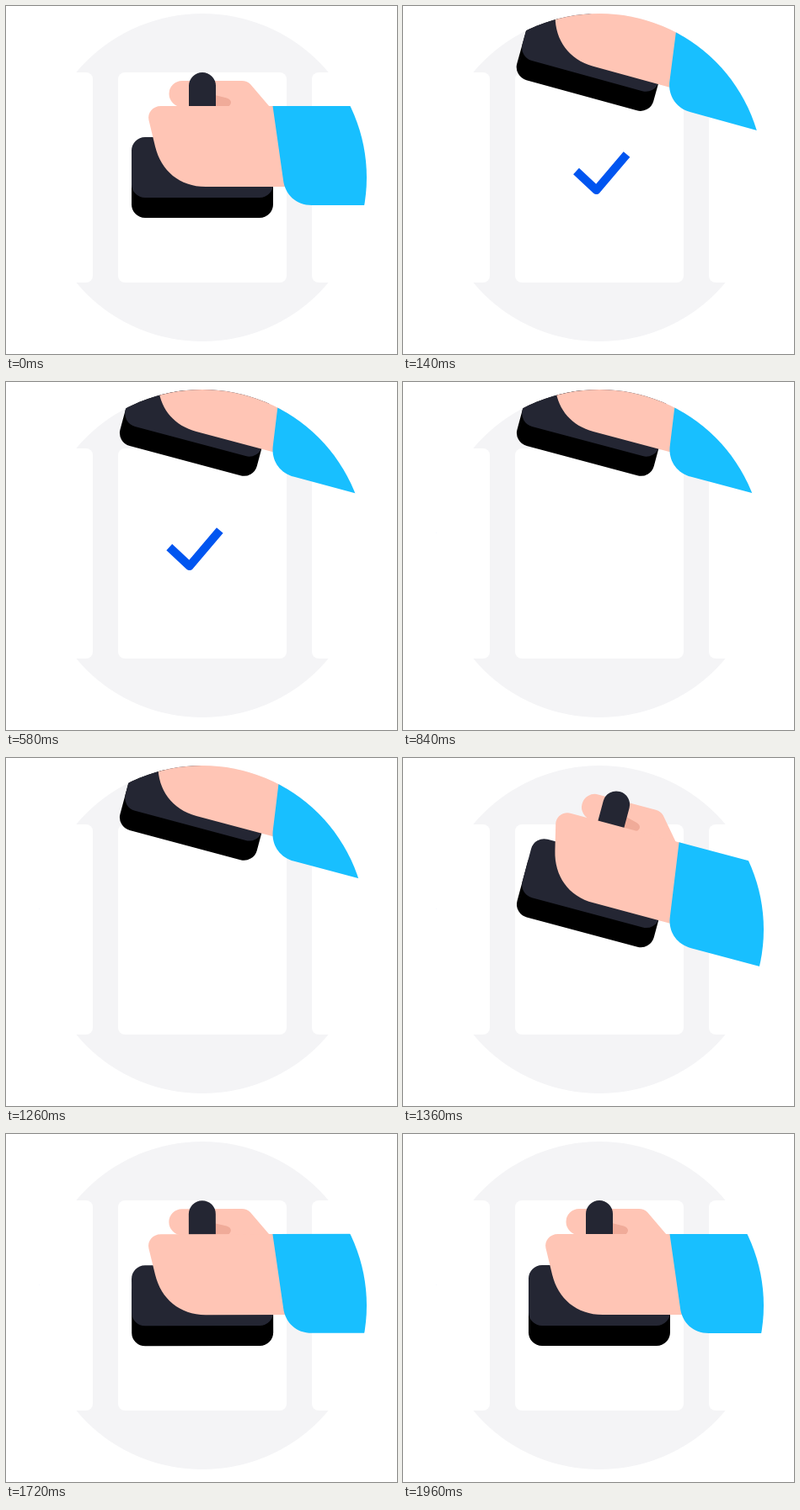
Animation of 464x414 px, one loop 2360 ms. Source, as an HTML page:

```html
<!DOCTYPE html>
<html lang="en">
<head>
<meta charset="utf-8">
<title>Stamp</title>
<style>
  html, body { margin: 0; width: 100%; height: 100%; overflow: hidden; background: #fff; }
  svg { display: block; }
</style>
</head>
<body>
<svg width="464" height="414" viewBox="0 0 464 414">
  <clipPath id="disc"><circle cx="233" cy="204" r="195"/></clipPath>
  <circle cx="233" cy="204" r="195" fill="#f4f4f6"/>
  <g fill="#fff">
    <rect x="-97" y="79" width="200" height="250" rx="8"/>
    <rect x="133" y="79" width="200" height="250" rx="8"/>
    <rect x="363" y="79" width="200" height="250" rx="8"/>
  </g>
  <g clip-path="url(#disc)">
    <path id="check" d="M205.5 196.5 L229.5 219 L265.5 176.5" fill="none"
      stroke="#0055f0" stroke-width="10" stroke-linejoin="round"/>
    <g id="stamp">
      <rect x="149" y="172" width="168" height="80" rx="16"/>
      <rect x="149" y="156" width="168" height="72" rx="16" fill="#242633"/>
      <path d="M209 89 H280 Q286 89 290 93 L313 120 H209 A15 15 0 0 1 209 89 Z" fill="#ffc5b5"/>
      <path d="M248 106 L262 109.500 Q267 111 267 115 Q266 120 261 120 H248 Z" fill="#f0ab99"/>
      <path d="M217 122 V95 A16 16 0 0 1 249 95 V122 Z" fill="#242633"/>
      <path d="M184 119 H322 L333 215 H237 C206 215 184 196 177 167 L169.500 136 C167.500 127 174 119 184 119 Z" fill="#ffc5b5"/>
      <path d="M316.500 119 H540 V237 H363 C344 237 331 224 329 207 Z" fill="#18bfff"/>
    </g>
  </g>
</svg>
<script>
  const LOOP = 2360, LIFT = -138, TILT = 15, SLIDE = -230;
  const check = document.getElementById('check');
  const stamp = document.getElementById('stamp');

  // Damped spring from 0 to 1, ms milliseconds after release
  function spring(ms, freq, damp) {
    if (ms <= 0) return 0;
    const s = ms / 1000, decay = freq * damp, wd = freq * Math.sqrt(1 - damp * damp);
    return 1 - Math.exp(-decay * s) * (Math.cos(wd * s) + decay / wd * Math.sin(wd * s));
  }

  function smooth(p) {
    p = Math.min(1, Math.max(0, p));
    return p * p * (3 - 2 * p);
  }

  function draw(t) {
    const y = LIFT * (spring(t, 20, .75) - spring(t - 1243, 24, .9));
    const angle = TILT * (spring(t, 26, .7) - spring(t - 1390, 20, .75));
    stamp.setAttribute('transform', `translate(0 ${y}) rotate(${angle} 300 164)`);
    check.setAttribute('transform', `translate(${SLIDE * smooth((t - 540) / 300)} 0)`);
  }

  const start = performance.now();
  function tick() {
    draw((performance.now() - start) % LOOP);
    requestAnimationFrame(tick);
  }
  tick();
</script>
</body>
</html>
```
